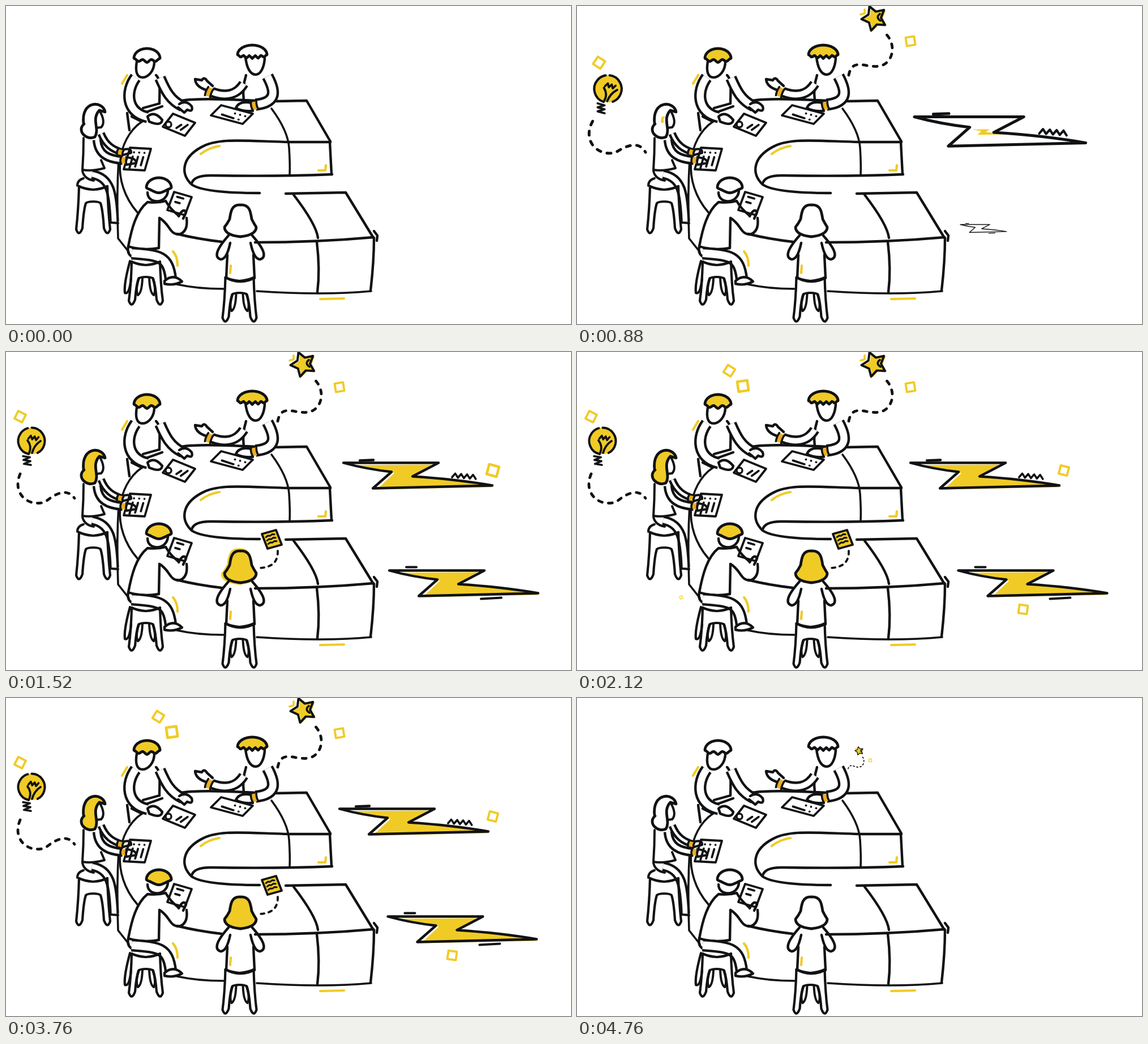
Write an HTML page with a canvas that moves like this. It is 998 px wide and 561 px high and loops after 4.8 s.

```html
<!DOCTYPE html>
<html lang="en">
<head>
<meta charset="utf-8">
<title>Round table</title>
<style>
  html, body { margin: 0; width: 100%; height: 100%; overflow: hidden; background: #fff; }
  canvas { display: block; width: 998px; height: 561px; }
</style>
</head>
<body>
<canvas id="stage" width="998" height="561"></canvas>
<script>
const ctx = document.getElementById('stage').getContext('2d');
const INK = '#111214', YELLOW = '#f0cb25', AMBER = '#e9af20';
const LOOP = 4800, TICK = 40, THICK = 4.4;

// ---- drawing helpers ----

function line(d, width = THICK, color = INK, dash = []) {
  ctx.lineWidth = width;
  ctx.strokeStyle = color;
  ctx.setLineDash(dash);
  ctx.stroke(new Path2D(d));
}

function fill(d, color = YELLOW) {
  ctx.fillStyle = color;
  ctx.fill(new Path2D(d));
}

function lines(width, ...paths) { for (const d of paths) line(d, width); }

function glow(d) { line(d, 4.2, YELLOW); }

const dotted = d => line(d, 4.8, INK, [7, 11]);

function placed(x, y, draw, scale = 1, turn = 0) {
  ctx.save();
  ctx.translate(x, y);
  ctx.rotate(turn * Math.PI / 180);
  ctx.scale(scale, scale);
  draw();
  ctx.restore();
}

// Grow or turn a drawing in stage coordinates around a pivot.
function around(x, y, scale, draw, turn = 0) {
  if (scale <= 0) return;
  placed(x, y, () => {
    ctx.translate(-x, -y);
    draw();
  }, scale, turn);
}

function mirrored(x, y, draw) {
  for (const side of [-1, 1]) {
    placed(x, y, () => {
      ctx.scale(side, 1);
      draw();
    });
  }
}

// A limb: an outlined tube with open ends.
function limb(d, width) {
  ctx.lineCap = 'butt';
  line(d, width + THICK);
  line(d, width - THICK, '#fff');
  ctx.lineCap = 'round';
}

function zigzag(x1, y1, x2, y2, steps, amp, width = 3.6) {
  const len = Math.hypot(x2 - x1, y2 - y1);
  let d = 'M';
  for (let i = 0; i <= steps; i++) {
    const u = i / steps, off = (i % 2 ? -amp : amp) / len;
    d += `${x1 + (x2 - x1) * u - (y2 - y1) * off} ${y1 + (y2 - y1) * u + (x2 - x1) * off} `;
  }
  line(d, width);
}

// A slanted sheet: one corner and two edge vectors; marks use 0..1 coordinates.
function sheet(x, y, ux, uy, vx, vy, color, marks) {
  const at = (u, v) => `${x + ux * u + vx * v} ${y + uy * u + vy * v} `;
  const d = `M${at(0, 0)}${at(1, 0)}${at(1, 1)}${at(0, 1)}Z`;
  fill(d, color);
  line(d, 3.8);
  marks((u1, v1, u2 = u1, v2 = v1) => line(`M${at(u1, v1)}L${at(u2, v2)}`, 3.8));
}

function cuff(x, y, height, turn) {
  placed(x, y, () => {
    const h = height / 2;
    fill(`M-5 ${-h}H5V${h}H-5Z`, AMBER);
    lines(3.6, `M-5 ${-h}Q-7 0 -5 ${h}`, `M5 ${-h}Q3 0 5 ${h}`);
  }, 1, turn);
}

function diamond(x, y, turn) {
  placed(x, y, () => line('M-7.5 -7.5H7.5V7.5H-7.5Z', 3.8, YELLOW), 1, turn);
}

// ---- motion ----

const clamp = u => Math.max(0, Math.min(1, u));
const ease = u => (1 - Math.cos(Math.PI * clamp(u))) / 2;

// Grow to a peak, then settle at full size.
function pop(age, peak = 1.2, settle = 240) {
  if (age <= 0) return 0;
  if (age < 240) return peak * Math.sin(age / 240 * Math.PI / 2);
  return peak + (1 - peak) * ease((age - 240) / settle);
}

function swing(x, y, age, draw) {
  const turn = 8 * (1 - ease((age - 280) / 260));
  around(x, y, pop(age, 1.3, 150), draw, turn);
}

// ---- hair: one outline each, also used for its colour ----

// Rounded on top, wavy along the bottom.
function cap(x, y, rx, ry, waves, depth) {
  let d = 'M';
  for (let i = 0; i < 60; i++) {
    const a = Math.PI * (1 + i / 30), sin = Math.sin(a), u = Math.cos(a);
    const drop = sin < 0 ? ry : depth + 2.5 * Math.cos(waves * Math.PI * u);
    d += `${x + rx * u} ${y + drop * sin} `;
  }
  return d + 'Z';
}

const HAIR = [
  { d: cap(249, 92, 23, 17, 3, 5), x: 249, y: 87, dx: 2.5, start: 160 },
  { d: cap(435, 86, 26, 17, 5, 4), x: 435, y: 80, dx: 3, start: 120 },
  { d: 'M137 208C132 165 172 167 175 187L165 184C150 200 166 216 157 231C142 238 124 220 138 208',
    x: 151, y: 200, dx: 2.5, start: 855 },
  { d: cap(270, 320, 22, 17, 1, 7), x: 270, y: 316, dx: 2.5, start: 1000 },
  { d: 'M414 351C430 350 432 362 434 376Q438 384 442 390Q442 404 414 407' +
       'Q386 404 386 390Q391 384 395 376C397 362 399 350 414 351Z',
    x: 420, y: 382, dx: -1, start: 1200 }
];

// ---- scenery ----

function table() {
  lines(THICK,
    'M309 167Q340 162 419 166', 'M477 168 531 167 573 239',
    'M573 240 500 240C420 238 375 232 345 249C310 268 308 296 328 315Q350 330 448 330',
    'M328 313Q332 298 365 299Q480 301 576 297', 'M572 240 575 297',
    'M494 331 600 329 649 409', 'M508 333Q548 385 551 409',
    'M302 402Q338 411 381 416', 'M440 417Q549 417 649 408',
    'M650 409Q650 450 644 502', 'M549 416Q555 465 550 505', 'M650 397 656 405 655 414');
  lines(3.6,
    'M469 181Q498 220 500 250T501 298', 'M302 491Q338 499 384 499',
    'M443 503Q560 511 645 503', 'M240 204C195 235 185 310 232 364',
    'M199 270Q195 335 198 410L217 434');
  glow('M205 137 214 122');
  glow('M344 261Q358 250 377 247');
  glow('M565 281 564 290 552 290');
  glow('M555 517 597 516');
}

function stool(x, y, h, back) {
  mirrored(x, y, () => {
    line(`M25 0Q26 40 30 ${h - 7}Q25 ${h + 7} 19 ${h - 9}Q17 42 13 30Q10 27 0 27`, 4.2);
    line('M0 6Q15 5 25 0', 4.2);
    if (back) line('M12 29Q19 50 14 59Q7 55 6 29', 4);
  });
}

function manA() {
  lines(THICK,
    'M231 98C228 115 231 126 241 126S262 115 262 98',
    'M265 122C274 130 271 150 271 172', 'M242 180 271 172', 'M248 187 276 177',
    'M214 189 218 219', 'M222 195 240 204');
  limb('M229 126C211 150 212 188 250 196', 17);
  limb('M272 127C282 150 290 166 312 177', 16);
  sheet(295, 190, 39, 16, -18, 23, '#fff', mark => {
    mark(.5, .75, .58, .45);
    mark(.7, .75, .8, .3);
    line('M282 209A5 5 0 1 0 292 209A5 5 0 1 0 282 209', 3.4);
  });
  fill('M250 195Q262 184 276 201Q274 213 253 204Z', '#fff');
  lines(THICK, 'M250 195Q262 184 276 201Q274 213 253 204Z',
    'M306 173Q318 165 328 177Q331 188 320 183L315 188 304 179');
}

function manB() {
  lines(THICK,
    'M423 90C425 110 432 121 441 121S456 108 457 92',
    'M424 122Q417 145 420 166L441 167');
  limb('M420 137Q402 166 364 152', 14);
  limb('M462 124C476 150 479 170 441 174', 17);
  sheet(380, 175, 56, 15, -18, 18, '#fff', mark => {
    mark(.25, .7, .6, .75);
    for (let i = 0; i < 5; i++) mark(.55 + i * .08, i % 2 ? .75 : .35);
  });
  fill('M434 171Q412 166 406 180Q418 187 436 185Z', '#fff');
  lines(THICK, 'M434 171Q412 166 406 180Q418 187 436 185',
    'M356 149Q335 143 334 129L346 131Q350 124 355 132L365 141');
  cuff(359, 152, 16, 22);
  cuff(439, 176, 14, -14);
}

function woman() {
  lines(4, 'M165 184Q177 205 168 214L160 215',
    'M137 233Q137 260 135 289Q152 292 174 286L168 272', 'M135 291Q138 305 155 308',
    'M186 373 185 382 198 383');
  limb('M152 297C185 303 189 330 191 380', 13);
  limb('M168 225C176 245 188 253 205 258', 9);
  limb('M161 236C163 262 180 270 206 272', 12);
  sheet(219, 250, 37, 2, -11, 38, '#fff', mark => {
    for (const u of [.25, .5, .75]) {
      mark(u, .2);
      mark(u, .4, u, 1 - u * .3);
    }
  });
  lines(4, 'M205 254Q222 249 221 259L206 263', 'M212 267Q230 268 230 277L213 280');
  cuff(202, 258, 9, 12);
  cuff(208, 272, 11, 5);
  line('M126 317Q126 307 137 304', 4);
  stool(154, 318, 83, false);
}

function seated() {
  lines(THICK, 'M250 329C250 350 284 350 286 326',
    'M282 344Q268 348 250 346C230 362 222 392 216 424Q240 432 270 427L271 374',
    'M216 424Q213 438 224 443');
  limb('M222 436C270 440 286 440 291 481', 18);
  sheet(297, 328, 31, 9, -12, 32, '#fff', mark => {
    mark(.25, .2, .6, .2);
    mark(.25, .48, .5, .48);
  });
  lines(THICK, 'M282 344Q290 358 305 370',
    'M271 374C290 385 288 402 305 403Q322 399 319 374',
    'M305 371Q313 355 318 364L313 375', 'M280 485Q296 471 311 486Q296 494 280 490Z');
  line('M219 450Q208 490 210 506Q218 510 221 480', 4.2);
  stool(247, 451, 76, true);
  glow('M295 433Q303 442 303 458');
}

function girl() {
  mirrored(414, 0, () => lines(THICK,
    'M21 405Q53 441 35 447Q24 447 18 418', 'M23 439 25 480', 'M0 486Q15 486 25 479'));
  stool(412.5, 479, 78, true);
  glow('M397 458 396 471');
}

// ---- things that pop up ----

function star() {
  let d = 'M';
  for (let i = 0; i < 10; i++) {
    const a = (-112 + i * 36) * Math.PI / 180, r = i % 2 ? 12 : 22.5;
    d += `${525 + r * Math.cos(a)} ${21.5 + r * Math.sin(a)} `;
  }
  d += 'Z';
  placed(3, 1, () => fill(d));
  line(d, 4);
  line('M535 14Q527 20 536 26', 3.6);
  line('M501 15 508 13 508 6', 3.6, YELLOW);
  dotted('M480 122C486 90 510 110 535 106C560 100 565 65 543 47');
  diamond(589, 62, -9);
}

function bulb() {
  const glass = 'M40 180A23.5 23.5 0 1 1 50 180';
  fill(glass);
  line(glass, 4, INK, [62, 7]);
  lines(3.8, 'M41 178Q46 166 38 156', 'M46 178Q50 164 61 157');
  zigzag(40, 150, 57, 153, 5, 3);
  zigzag(36, 183, 38, 200, 5, 6);
  dotted('M25 215C10 250 40 275 70 264Q105 235 121 258');
  diamond(25, 114, 27);
}

function bolt(fillSize, dashes) {
  around(106, 23, fillSize, () => fill('M18 4 156 3 124 25Q200 30 265 43L59 47 90 18Z'));
  line('M0 0 168 0 122 24Q200 29 263 40L52 45 85 16Q40 11 0 0Z');
  dashes();
}

function note() {
  sheet(452, 321, 25, -7, 10, 26, YELLOW, () => {
    for (let i = 0; i < 3; i++) zigzag(459 + i * 2, 326 + i * 6, 474 + i * 2, 321 + i * 6, 4, .7, 3);
  });
  line('M480 351Q481 381 445 381', 3.8, INK, [6, 8]);
}

function bolts(s) {
  const sway = (from, to) => -7 * Math.sin(Math.PI * clamp((s - from) / (to - from)));
  placed(596 + sway(1520, 2640), 195.5, () => bolt(pop(s - 855), () => {
    line('M29 -4 53 -5');
    zigzag(192, 22, 234, 25, 8, 3.5);
  }), pop(s - 560));
  placed(677 + sway(1980, 2800), 385.5, () => bolt(pop(s - 1000), () =>
    lines(4, 'M30 -6H48', 'M162 50 198 48')), pop(s - 840));
}

function sparks(s) {
  const spark = (x, y, turn, start) =>
    around(x, y, pop(s - start), () => diamond(x, y, turn));
  spark(860, 209, 15, 1280);
  spark(788, 454, 8, 1560);
  spark(269, 33, 32, 1640);
  spark(293, 60, -8, 1840);
  spark(184, 433, -20, 2080);
  spark(483, 528, 20, 2280);
}

function scene(s) {
  ctx.fillStyle = '#fff';
  ctx.fillRect(0, 0, 998, 561);
  ctx.lineCap = ctx.lineJoin = 'round';

  for (const h of HAIR) {
    around(h.x, h.y, pop(s - h.start), () => placed(h.dx, 0, () => fill(h.d)));
  }
  for (const draw of [table, manA, manB, woman, seated, girl]) draw();
  for (const h of HAIR) line(h.d, 4.8);

  swing(478, 126, s - 40, star);
  swing(121, 258, s - 520, bulb);
  bolts(s);
  around(445, 381, pop(s - 960), note);
  sparks(s);
}

// Build up, hold, then run back at double speed.
function storyTime(t) {
  if (t < 2800) return t;
  return t < 3440 ? 2800 : 2 * (LOOP - t);
}

let begin = null;
function frame(now) {
  if (begin === null) begin = now;
  const t = Math.floor(((now - begin) % LOOP) / TICK) * TICK;
  scene(storyTime(t));
  requestAnimationFrame(frame);
}
scene(0);
requestAnimationFrame(frame);
</script>
</body>
</html>
```
